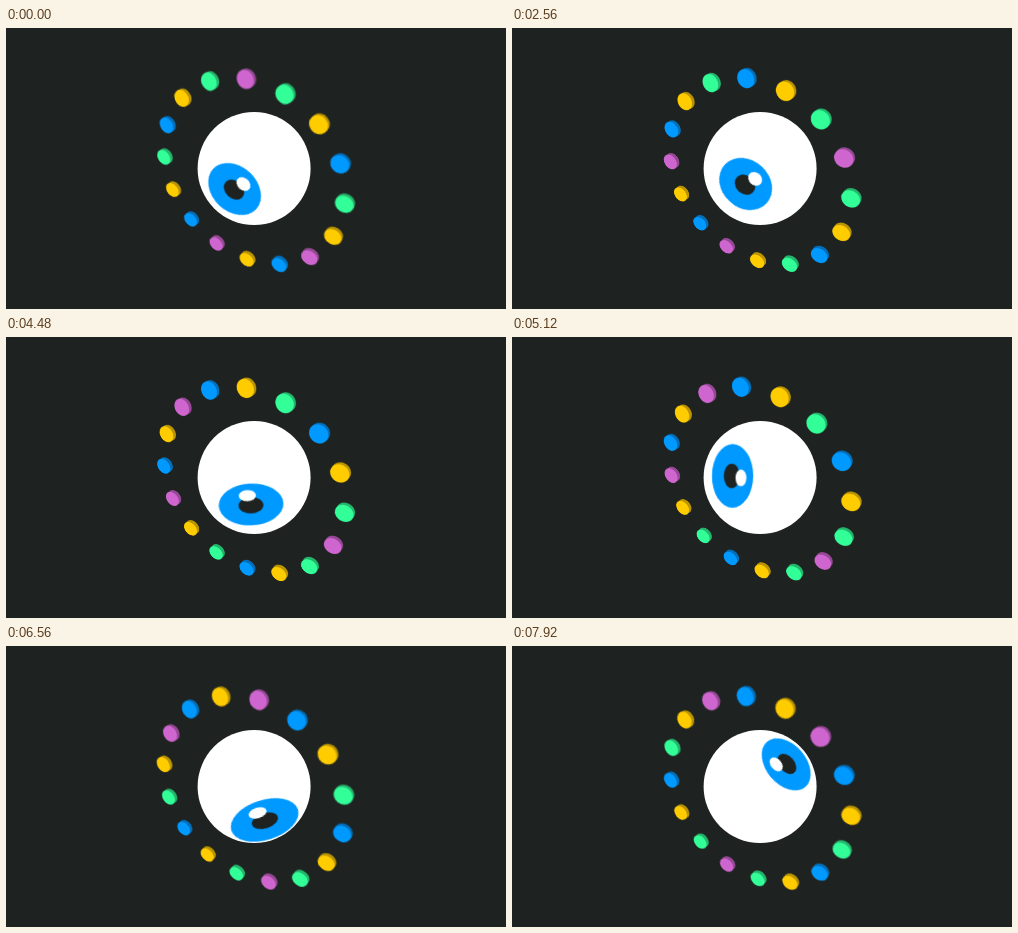
Write an HTML page without scripts that moves like this. It is 500 px wide and 281 px high and loops after 8000 ms.

```html
<!DOCTYPE html>
<html lang="en">
<head>
<meta charset="utf-8">
<title>Rolling eye</title>
<style>
  html, body { margin: 0; width: 100%; height: 100%; overflow: hidden; background: #1e2220; }
  .stage { position: relative; width: 500px; height: 281px; overflow: hidden; }
  .stage > svg { position: absolute; inset: 0; }

  /* Tilted plane seen in perspective, drawn at double size to stay crisp;
     --z is the depth of a slice of the discs */
  .slice {
    --y: #b99300; --b: #006eb8; --g: #24b56c; --p: #964896;
    position: absolute; left: 250px; top: 140.5px; width: 0; height: 0;
    transform-origin: 0 0;
    transform: matrix3d(
      .5005, .1225, 0, -.000495,
      0, .5, 0, .000555,
      0, 0, 1, 0,
      calc(-9 + .526 * var(--z)), calc(8.8 - .464 * var(--z)), 0, calc(1 + .00188 * var(--z)));
  }
  .slice svg { position: absolute; left: -240px; top: -240px; }
  .slice use { animation: spin 8s steps(100) infinite; }
  .face { --y: #fc0; --b: #09f; --g: #3f9; --p: #cf66cf; }
  .y { fill: var(--y); }
  .b { fill: var(--b); }
  .g { fill: var(--g); }
  .p { fill: var(--p); }
  @keyframes spin {
    from { transform: rotate(.2deg); }
    to { transform: rotate(201.2deg); }
  }

  /* Iris is a unit disc: roll angle, distance from centre, tilt, foreshortening */
  .iris { animation: roll 8s infinite; }
  .glint { animation: glint 8s infinite; }
  @keyframes roll {
    0%   { transform: rotate(133.5deg) translate(28.3px, 0) rotate(0deg) scale(22.5, 29.5); animation-timing-function: steps(17); }
    17%  { transform: rotate(263.5deg) translate(30.7px, 0) rotate(0deg) scale(19, 31.2); animation-timing-function: steps(15); }
    32%  { transform: rotate(493deg) translate(21.2px, 0) rotate(0deg) scale(23.8, 28.5); animation-timing-function: steps(24); }
    56%  { transform: rotate(816.5deg) translate(27.2px, 0) rotate(-9deg) scale(21, 32.4); animation-timing-function: steps(17); }
    73%  { transform: rotate(1001deg) translate(28px, 0) rotate(4deg) scale(20.3, 31.2); animation-timing-function: steps(9); }
    82%  { transform: rotate(1152.5deg) translate(35.1px, 0) rotate(0deg) scale(20, 35); animation-timing-function: steps(17); }
    99%  { transform: rotate(1399.7deg) translate(34.2px, 0) rotate(0deg) scale(20, 29.6); animation-timing-function: steps(1); }
    100% { transform: rotate(1412deg) translate(34px, 0) rotate(0deg) scale(20, 29.6); }
  }
  @keyframes glint {
    0%   { transform: translate(-.43px, -.1px); animation-timing-function: steps(17); }
    17%  { transform: translate(-.48px, -.22px); animation-timing-function: steps(15); }
    32%  { transform: translate(-.43px, -.12px); animation-timing-function: steps(24); }
    56%  { transform: translate(-.43px, .1px); animation-timing-function: steps(17); }
    73%  { transform: translate(-.38px, -.24px); animation-timing-function: steps(9); }
    82%  { transform: translate(-.44px, .13px); animation-timing-function: steps(17); }
    99%, 100% { transform: translate(-.38px, -.22px); }
  }
</style>
</head>
<body>
<div class="stage">
  <svg width="500" height="281" viewBox="0 0 500 281">
    <defs>
      <circle id="dot" cy="-90" r="7.75"/>
      <g id="ring">
        <use href="#dot" class="p"/>
        <use href="#dot" class="g" transform="rotate(22.5)"/>
        <use href="#dot" class="y" transform="rotate(45)"/>
        <use href="#dot" class="b" transform="rotate(67.5)"/>
        <use href="#dot" class="g" transform="rotate(90)"/>
        <use href="#dot" class="y" transform="rotate(112.5)"/>
        <use href="#dot" class="p" transform="rotate(135)"/>
        <use href="#dot" class="b" transform="rotate(157.5)"/>
        <use href="#dot" class="y" transform="rotate(180)"/>
        <use href="#dot" class="p" transform="rotate(202.5)"/>
        <use href="#dot" class="b" transform="rotate(225)"/>
        <use href="#dot" class="y" transform="rotate(247.5)"/>
        <use href="#dot" class="g" transform="rotate(270)"/>
        <use href="#dot" class="b" transform="rotate(292.5)"/>
        <use href="#dot" class="y" transform="rotate(315)"/>
        <use href="#dot" class="g" transform="rotate(337.5)"/>
      </g>
    </defs>
    <g transform="translate(248.1 140.5)">
      <circle r="56.5" fill="#fff"/>
      <g class="iris">
        <circle r="1" fill="#09f"/>
        <circle cx=".04" r=".385" fill="#1e2220"/>
        <circle class="glint" r=".265" fill="#fff"/>
      </g>
    </g>
  </svg>
  <div class="slice" style="--z: 2"><svg width="480" height="480" viewBox="-120 -120 240 240"><use href="#ring"/></svg></div>
  <div class="slice face" style="--z: -2"><svg width="480" height="480" viewBox="-120 -120 240 240"><use href="#ring"/></svg></div>
</div>
</body>
</html>
```
